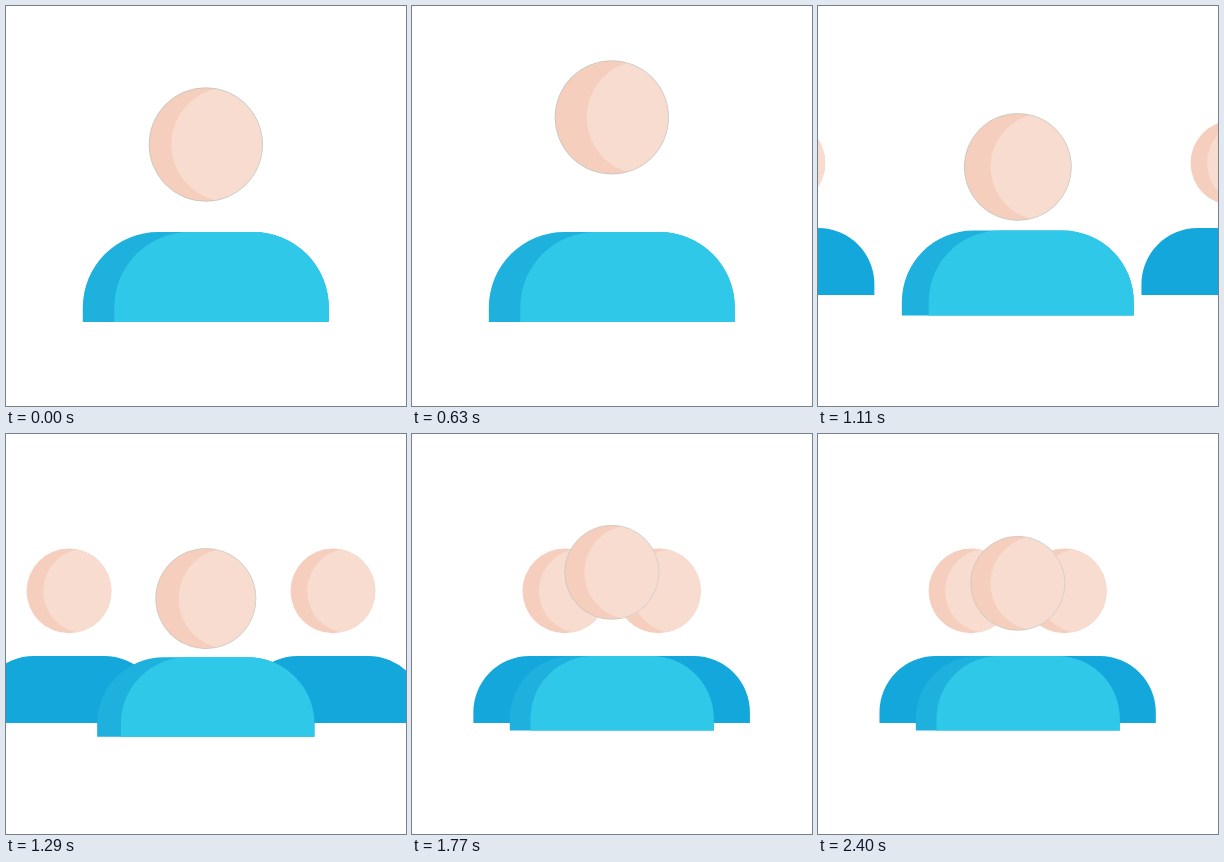
An HTML page that plays this animation: 400x400 px, repeating every 2520 ms.

```html
<!DOCTYPE html>
<html lang="en">
<head>
<meta charset="utf-8">
<title>Team</title>
<style>
  html, body { margin: 0; width: 100%; height: 100%; overflow: hidden; background: #fff; }
  svg { display: block; width: 100%; height: 100%; }
  .skin { fill: #f5cebd; }
  .glow { fill: #f8dcd0; }
  .shade { fill: #1eb1de; }
  .shirt { fill: #2fc8e9; }
  .back { fill: #14a7db; }
  .rim { fill: none; stroke: #2aa5b5; stroke-width: .5; opacity: .4; }
</style>
</head>
<body>
<svg viewBox="0 0 400 400">
  <defs>
    <clipPath id="face"><circle r="57"/></clipPath>
    <g id="side">
      <path class="back"/>
      <g transform="translate(0 138.5)">
        <circle class="skin" r="57"/>
        <g clip-path="url(#face)"><circle class="glow" cx="22.2" r="57"/></g>
      </g>
    </g>
  </defs>
  <use id="left" href="#side"/>
  <use id="right" href="#side"/>
  <g id="main">
    <path class="shade"/>
    <path class="shirt"/>
    <g id="head">
      <circle class="skin" r="57"/>
      <g clip-path="url(#face)"><circle id="light" class="glow" r="57"/></g>
      <circle class="rim" r="56.8"/>
    </g>
  </g>
</svg>
<script>
const LOOP = 2520, STEP = 30, LAST = 2400;
const HALF = 123, TOP = 226, BOTTOM = 316, ROUND = 75.5;

// [time, value] pairs, eased between neighbours
const BOB = [[0, 138.5], [600, 111], [1215, 162.4], [1665, 124.4], [2400, 138.5]];
const FACE = [[0, 22.5], [600, 32], [1665, 24]];
const INSET = [[0, 31.5], [600, 31.5], [1665, 25]];

const $ = s => document.querySelector(s);
const clamp = u => Math.min(1, Math.max(0, u));
const mix = (a, b, p) => a + (b - a) * p;
const smooth = u => u * u * (3 - 2 * u);

// cubic-bezier(.59, 0, .41, 1), solved by bisection
function glide(u) {
  let lo = 0, hi = 1;
  for (let i = 0; i < 24; i++) {
    const s = (lo + hi) / 2, r = 1 - s;
    if (1.77 * s * r * r + 1.23 * s * s * r + s ** 3 < u) lo = s; else hi = s;
  }
  return smooth(lo);
}

function track(keys, t) {
  for (let i = 1; i < keys.length; i++) {
    const [t0, a] = keys[i - 1], [t1, b] = keys[i];
    if (t <= t1) return mix(a, b, smooth((t - t0) / (t1 - t0)));
  }
  return keys[keys.length - 1][1];
}

const torso = inset => {
  const x = inset - HALF, y = TOP + ROUND, r = ROUND;
  return `M${x} ${BOTTOM}V${y}a${r} ${r} 0 0 1 ${r} ${-r}H${HALF - r}a${r} ${r} 0 0 1 ${r} ${r}V${BOTTOM}Z`;
};

const place = (el, x, y, s, pivot) =>
  el.setAttribute('transform', `translate(${x} ${y}) scale(${s}) translate(0 ${-pivot})`);

const left = $('#left'), right = $('#right'), main = $('#main');
const head = $('#head'), light = $('#light'), shirt = $('.shirt');
$('.back').setAttribute('d', torso(0));
$('.shade').setAttribute('d', torso(0));

function draw(t) {
  const p = glide(clamp((t - 595) / 1200));
  place(left, mix(-130, 153, p), 222, .744, TOP);
  place(right, mix(500, 246.3, p), 222, .744, TOP);
  place(main, 199.8, 202, mix(1, .829, p), 202);
  head.setAttribute('transform', `translate(0 ${track(BOB, t)})`);
  light.setAttribute('cx', track(FACE, t));
  shirt.setAttribute('d', torso(track(INSET, t)));
}

const start = performance.now();
function tick() {
  const t = (performance.now() - start) % LOOP;
  draw(Math.min(LAST, Math.floor(t / STEP) * STEP));
  requestAnimationFrame(tick);
}
tick();
</script>
</body>
</html>
```
